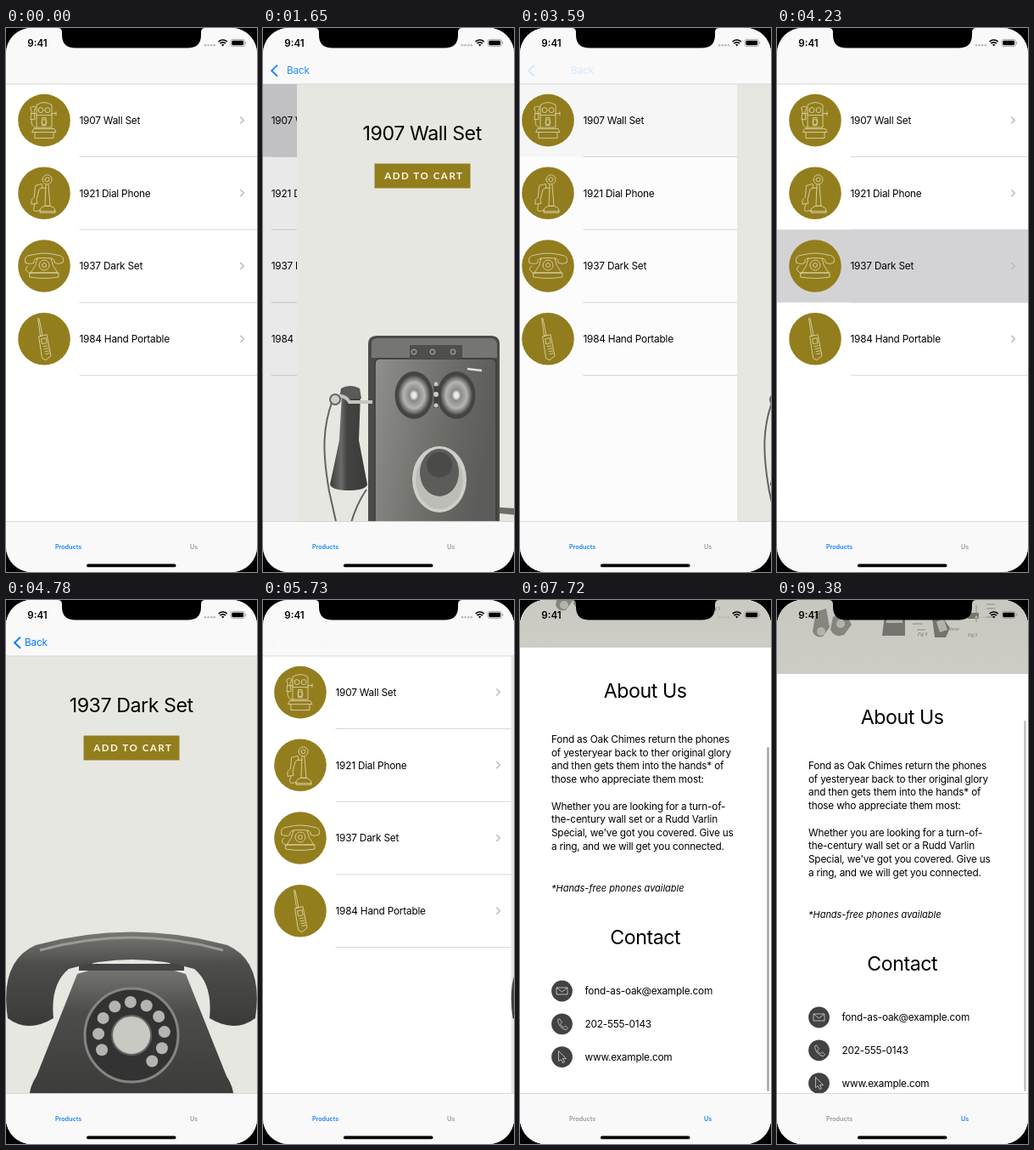
Write an HTML page that moves like this. It is 296x640 px and loops after 9.41 s.

```html
<!DOCTYPE html>
<html lang="en">
<head>
<meta charset="utf-8">
<title>Phone shop</title>
<style>
html, body { margin: 0; height: 100%; overflow: hidden; background: #000; }
svg { display: block; width: 100vw; height: 100vh; }
text { font: 11.8px Inter, Roboto, sans-serif; letter-spacing: -.2px; white-space: pre; }
.title { font-size: 23.2px; letter-spacing: -.45px; text-anchor: middle; }
.note { font-size: 11px; font-style: italic; letter-spacing: -.02px; }
.tab { font-size: 7.2px; font-weight: 600; letter-spacing: 0; text-anchor: middle; }
.cta { font: 700 11.5px Lato, sans-serif; letter-spacing: 1.55px; }
.clock { font-size: 11.6px; font-weight: 600; letter-spacing: 0; text-anchor: middle; }
.tiny { font: italic 5px "Noto Serif", serif; letter-spacing: 0; fill: #77766f; }
.line { fill: none; stroke: #ddd4a6; stroke-width: .9; stroke-linejoin: round; stroke-linecap: round; }
.thin { fill: none; stroke: #cfcfcf; stroke-width: .8; }
</style>
</head>
<body>
<svg viewBox="0 0 296 640" preserveAspectRatio="none">
<defs>
  <clipPath id="screen"><rect width="296" height="640" rx="30"/></clipPath>
  <linearGradient id="wood" x2="1" y2=".25"><stop stop-color="#8f8f8b"/><stop offset=".35" stop-color="#7b7b78"/><stop offset=".7" stop-color="#686865"/><stop offset="1" stop-color="#5c5c5a"/></linearGradient>
  <linearGradient id="tube"><stop stop-color="#3c3c3b"/><stop offset=".3" stop-color="#6a6a68"/><stop offset=".45" stop-color="#444443"/><stop offset="1" stop-color="#3a3a39"/></linearGradient>
  <radialGradient id="bell"><stop offset=".1" stop-color="#ecece8"/><stop offset=".24" stop-color="#8a8a87"/><stop offset=".55" stop-color="#b4b4b0"/><stop offset=".72" stop-color="#777774"/><stop offset=".85" stop-color="#444443"/></radialGradient>
  <linearGradient id="bakelite" x2="0" y2="1"><stop stop-color="#787875"/><stop offset=".35" stop-color="#4c4c4a"/><stop offset="1" stop-color="#3a3a39"/></linearGradient>
  <linearGradient id="paper" x2="0" y2="1"><stop stop-color="#c3c2b9"/><stop offset="1" stop-color="#cdccc5"/></linearGradient>
</defs>
<g clip-path="url(#screen)">
  <rect width="296" height="640" fill="#fff"/>
  <g id="shop">
    <g id="list"></g>
    <rect id="dim" width="296" height="640"/>
    <g id="detail">
      <rect width="296" height="640" fill="#e7e7e2"/>
      <g id="wallSet">
        <path d="M42 438C30 470 30 500 38 545L47 585M82 543Q70 560 63 585" fill="none" stroke="#62625f" stroke-width="2"/>
        <path d="M239 564l18 1 1 8-19-2z" fill="#6c6c69"/>
        <path d="M84 590V372q0-10 10-10H229q10 0 10 10V590z" fill="#4b4b49"/>
        <path d="M88 369q2-4 7-4H228q8 0 8 9v14H88z" fill="#757572"/>
        <path d="M92 590V395q0-6 6-6H229q6 0 6 6V590z" fill="url(#wood)" stroke="#3a3a39" stroke-width="1.5"/>
        <rect x="133" y="373" width="62" height="16" fill="#4e4e4c"/>
        <g fill="#5a5a58" stroke="#b0b0ac"><circle cx="138" cy="381" r="3"/><circle cx="160" cy="381" r="3"/><circle cx="184" cy="381" r="3"/></g>
        <path d="M201 401l17 2" stroke="#e2e2dd" stroke-width="2.5"/>
        <ellipse cx="138" cy="432" rx="22.5" ry="28" fill="url(#bell)"/>
        <ellipse cx="188" cy="432" rx="22.5" ry="28" fill="url(#bell)"/>
        <path d="M164 417v30" stroke="#404040" stroke-width="5"/>
        <g fill="#c9c9c5"><circle cx="164" cy="419" r="2.5"/><circle cx="164" cy="431" r="3"/><circle cx="164" cy="444" r="2.5"/></g>
        <ellipse cx="168" cy="531" rx="32" ry="39" fill="#cfcfca"/>
        <ellipse cx="168" cy="532" rx="28" ry="34" fill="#bdbdb8"/>
        <ellipse cx="168" cy="523" rx="23" ry="28" fill="#5c5c5a"/>
        <ellipse cx="168" cy="514" rx="15" ry="15" fill="#4a4a48"/>
        <path d="M53 430h22l-2 55 10 52q-2 7-22 7t-22-7l11-52z" fill="url(#tube)"/>
        <path d="M52 424q11-6 22 0l2 12H50z" fill="#5a5a58"/>
        <path d="M89 440H62q-5-9-17-7" fill="none" stroke="#c4c4bf" stroke-width="4"/>
        <circle cx="45" cy="437" r="6" fill="#cdcdc8" stroke="#666" stroke-width="2"/>
      </g>
      <g id="darkSet">
        <path d="M84 440Q148 418 212 440L260 560Q270 575 268 590H28Q26 575 36 560z" fill="url(#bakelite)"/>
        <path d="M86 436v-26h16v18h92v-18h16v26z" fill="#444"/>
        <path d="M2 492Q-8 425 35 406Q148 375 261 406Q304 425 294 492Q270 510 240 492Q244 452 222 434Q148 412 74 434Q52 452 56 492Q26 510 2 492z" fill="url(#bakelite)"/>
        <path d="M40 412Q148 382 256 412" fill="none" stroke="#9a9a97" stroke-width="3"/>
        <circle cx="148" cy="512" r="55" fill="#333" stroke="#858582" stroke-width="3"/>
        <g id="holes" fill="#b4b4b0"></g>
        <circle cx="148" cy="512" r="23" fill="#c9c9c4" stroke="#666" stroke-width="2"/>
      </g>
      <text id="name" class="title" x="147.7" y="131.8"></text>
      <rect id="button" x="91.5" y="159.5" width="113" height="29"/>
      <text id="cta" class="cta" x="103.2" y="178.3">ADD TO CART</text>
    </g>
    <rect width="296" height="66" fill="#f9f9f9"/>
    <path class="thin" d="M0 65.9H296"/>
    <g id="back" fill="#007aff">
      <path d="M17 43.6L10.2 50.2L17 56.8" fill="none" stroke="#007aff" stroke-width="2"/>
      <text id="backText" y="54.3">Back</text>
    </g>
  </g>
  <g id="us">
    <rect width="296" height="640" fill="#fff"/>
    <g id="page">
      <rect y="34" width="296" height="185" fill="url(#paper)"/>
      <g fill="#85847d">
        <path d="M46 146l12-4 4 22-8 11q-9 2-12-6zM66 152l14-7 8 16-9 12q-11 4-16-6z"/>
        <path d="M127 150h24v24h-27zM183 153l7-8 14 20-5 11h-13zM225 147h13v7h-13z" fill="#74736d"/>
        <path d="M42 58h46v62H42zM126 62h30v54h-30z" fill="#96958d"/>
        <circle cx="206" cy="88" r="26" fill="#8b8a83"/>
      </g>
      <g fill="#b4b3aa"><circle cx="75" cy="160" r="5"/><circle cx="52" cy="169" r="5"/><path d="M129 154h19v5h-19zM188 158l8-5 5 14-9 3z"/><circle cx="206" cy="88" r="10"/></g>
      <path d="M160 160h12M165 167h10M247 137h10M247 142h10M247 152h10M235 138v20" stroke="#8b8a83" fill="none"/>
      <text class="tiny" x="166" y="174">Fig 4</text><text class="tiny" x="204" y="168">lever</text>
      <text class="tiny" x="225" y="175">Fig 5</text>
      <text class="title" x="147.7" y="278.3">About Us</text>
      <g id="copy"></g>
      <text class="note" x="37" y="506">*Hands-free phones available</text>
      <text class="title" x="147.7" y="568.3">Contact</text>
      <g id="contact"></g>
    </g>
    <rect id="bar" x="291.4" width="2.2" rx="1.1" fill="#999"/>
  </g>
  <rect y="580.5" width="296" height="60" fill="#f9f9f9"/>
  <path class="thin" d="M0 580.6H296"/>
  <text id="tabShop" class="tab" x="73.5" y="612.6">Products</text>
  <text id="tabUs" class="tab" x="221.5" y="612.6">Us</text>
  <rect x="95" y="630.5" width="105.5" height="3.8" rx="1.9"/>
  <path d="M61 0Q66 0 66 5V8Q66 23.6 82 23.6H214Q230 23.6 230 8V5Q230 0 235 0z"/>
  <text class="clock" x="37" y="21.6">9:41</text>
  <g fill="#bbb"><circle cx="235" cy="20.3" r="1.3"/><circle cx="238.6" cy="20.3" r="1.3"/><circle cx="242.2" cy="20.3" r="1.3"/><circle cx="245.8" cy="20.3" r="1.3"/></g>
  <path d="M250.6 16.2Q255.7 11.8 260.8 16.2M252.4 18.2Q255.7 15.4 259 18.2" fill="none" stroke="#000" stroke-width="1.6"/>
  <path d="M253.9 19.6q1.8-1.4 3.6 0l-1.8 2z"/>
  <rect x="265" y="13.4" width="16.4" height="8.2" rx="2.2" fill="none" stroke="#999" stroke-width=".8"/>
  <rect x="266.3" y="14.7" width="13.8" height="5.6" rx="1.2"/>
  <path d="M282.4 16v3q1-.4 1-1.5t-1-1.5" fill="#999"/>
</g>
</svg>
<script>
const $ = id => document.getElementById(id);
const set = (id, attrs) => { for (const k in attrs) $(id).setAttribute(k, attrs[k]); };
const show = (id, on) => set(id, { display: on ? 'inline' : 'none' });

const LOOP = 9410, ROW = 85.7, MAX_SCROLL = 132, BOUNCE = 31;

const products = [
  ['1907 Wall Set', 'M-9 8V-18q9-6 18 0V8zM-12 10H12L14 14H-14zM-11 14V21H11V14M-9-6H9M-2-3h4v9h-4zM9-8h5M14-10v4M-9-8H-15M-16-15q4-3 6 0l-2 5 1 9h-5l1-9z M-15-1Q-16 8-9 9M-7-12a3 3 0 1 0 6 0a3 3 0 1 0-6 0M1-12a3 3 0 1 0 6 0a3 3 0 1 0-6 0M-3 2a3 3 0 1 0 6 0a3 3 0 1 0-6 0'],
  ['1921 Dial Phone', 'M-2-16a5.5 5.5 0 1 0 11 0a5.5 5.5 0 1 0-11 0M1-16a2.5 2.5 0 1 0 5 0a2.5 2.5 0 1 0-5 0M2-10L1 15H7L5-10M-5 21q0-6 9-6t9 6zM-5 21v2h18v-2M-10-9l7-2 1 4-4 3-3 12 1 4-7 1 0-5 3-3zM-11 13Q-16 25-5 20M2-6H-3'],
  ['1937 Dark Set', 'M-22-4Q-25-12-15-13Q0-17 15-13Q25-12 22-4Q17-1 12-4Q13-8 8-9Q0-10-8-9Q-13-8-12-4Q-17-1-22-4zM-8-9Q-9 0-16 8H16Q9 0 8-9M-17 8h34v5q-17 3-34 0zM-6-1a6 6 0 1 0 12 0a6 6 0 1 0-12 0M-2.5-1a2.5 2.5 0 1 0 5 0a2.5 2.5 0 1 0-5 0M-16 9Q-26 4-19 0'],
  ['1984 Hand Portable', 'M-7-24l1 0 4 20-2 1zM-6-3L3-5L8 20L2 25L-2 23zM-3 0l5-1 1 6-5 1zM-1 9l5-1M0 12l5-1M1 15l5-1M2 18l4-1']
];

$('list').innerHTML = products.map(([name, art], i) => {
  const y = 108.6 + ROW * i;
  return `<g transform="translate(0 ${y})">
    <rect id="row${i}" y="-42.8" width="296" height="${ROW}" fill="#d3d3d6"/>
    <circle cx="45" r="30.8" fill="#937e1e"/><path class="line" transform="translate(45 0)" d="${art}"/>
    <text x="86.5" y="4.2">${name}</text>
    <path d="M276.3-4L280.3 0L276.3 4" fill="none" stroke="#b9b9bc" stroke-width="1.4"/>
    <path class="thin" d="M86.5 42.9H296"/></g>`;
}).join('');

$('holes').innerHTML = Array.from({ length: 10 }, (_, i) => {
  const a = .9 - i * .5;
  return `<circle cx="${148 + 39 * Math.cos(a)}" cy="${512 + 39 * Math.sin(a)}" r="7"/>`;
}).join('');

$('copy').innerHTML = [
  'Fond as Oak Chimes return the phones', 'of yesteryear back to ther original glory',
  'and then gets them into the hands* of', 'those who appreciate them most:', '',
  'Whether you are looking for a turn-of-', 'the-century wall set or a Rudd Varlin',
  "Special, we've got you covered. Give us", 'a ring, and we will get you connected.'
].map((s, i) => `<text x="37" y="${331 + 15.72 * i}">${s}</text>`).join('');

$('contact').innerHTML = [
  ['fond-as-oak@example.com', 'M-6.5-4H6.5V4H-6.5zL0 1L6.5-4'],
  ['202-555-0143', 'M-5-5l2-1 3 4-2 2q1 3 4 4l2-2 3 3-2 2Q-4 5-5-5z'],
  ['www.example.com', 'M-4-7L5 2L1 2L3 6L1 7L-1 3L-4 5z']
].map(([s, art], i) => `<g transform="translate(49.5 ${623 + 38.8 * i})">
  <circle r="12.4" fill="#424242"/><path d="${art}" fill="none" stroke="#d5d5d5" stroke-width=".8"/>
  <text x="27" y="4.1">${s}</text></g>`).join('');

// Index of the current step when n steps run from a to b.
const step = (t, a, b, n) => Math.max(-1, Math.min(n - 1, Math.floor((t - a) / (b - a) * (n - 1) + .05)));
// Share of a slide still to go at step k of n.
const left = (k, n) => k <= 0 ? 1 : k >= n - 1 ? 0 : Math.exp(-.82 * (k - .56));

const visits = [
  { row: 0, push: [1420, 1950, 8], pop: [3350, 3910, 8] },
  { row: 2, push: [4230, 4780, 8], pop: [5260, 5890, 9] }
];

function drawShop(t) {
  const { row, push, pop } = visits[t < 4230 ? 0 : 1];
  const popStep = step(t, ...pop);
  const leaving = popStep >= 0;
  const shown = leaving ? left(popStep, pop[2]) : 1 - left(step(t, ...push), push[2]);
  products.forEach((_, i) => set('row' + i, {
    opacity: i !== row || t < push[0] ? 0 : leaving ? shown : 1
  }));
  set('list', { transform: `translate(${-88.8 * shown})` });
  set('dim', { opacity: .1 * shown });
  set('detail', { transform: `translate(${296 * (1 - shown)})` });
  show('wallSet', row === 0);
  show('darkSet', row === 2);
  $('name').textContent = products[row][0];
  const pressed = t >= 2750 && t < 2830;
  set('button', { fill: pressed ? '#5d5115' : '#937e1e' });
  set('cta', { fill: pressed ? '#8f8560' : '#fbf7e8' });
  set('back', { opacity: popStep === 0 ? .3 : shown });
  set('backText', { x: 22 + 44 * (1 - shown) });
}

function drawUs(t) {
  const k = step(t, 7340, 8290, 14);
  const peak = MAX_SCROLL + BOUNCE;
  const y = k < 0 ? 0
    : k <= 5 ? peak * (1 - (1 - (k + 1) / 6) ** 2)
    : MAX_SCROLL + (k < 13 ? BOUNCE * Math.exp(-.5 * (k - 5)) : 0);
  const over = Math.max(0, y - MAX_SCROLL);
  set('page', { transform: `translate(0 ${-y})` });
  set('bar', {
    y: 37 + 105 * (y - over) / MAX_SCROLL + over,
    height: 436 - over,
    opacity: k < 0 ? 0 : t < 9380 ? 1 : .7
  });
}

function draw() {
  const t = performance.now() % LOOP;
  const onUs = t >= 6230;
  show('shop', !onUs);
  show('us', onUs);
  set('tabShop', { fill: onUs ? '#999' : '#1a82f7' });
  set('tabUs', { fill: onUs ? '#1a82f7' : '#999' });
  onUs ? drawUs(t) : drawShop(t);
  requestAnimationFrame(draw);
}
draw();
</script>
</body>
</html>
```
